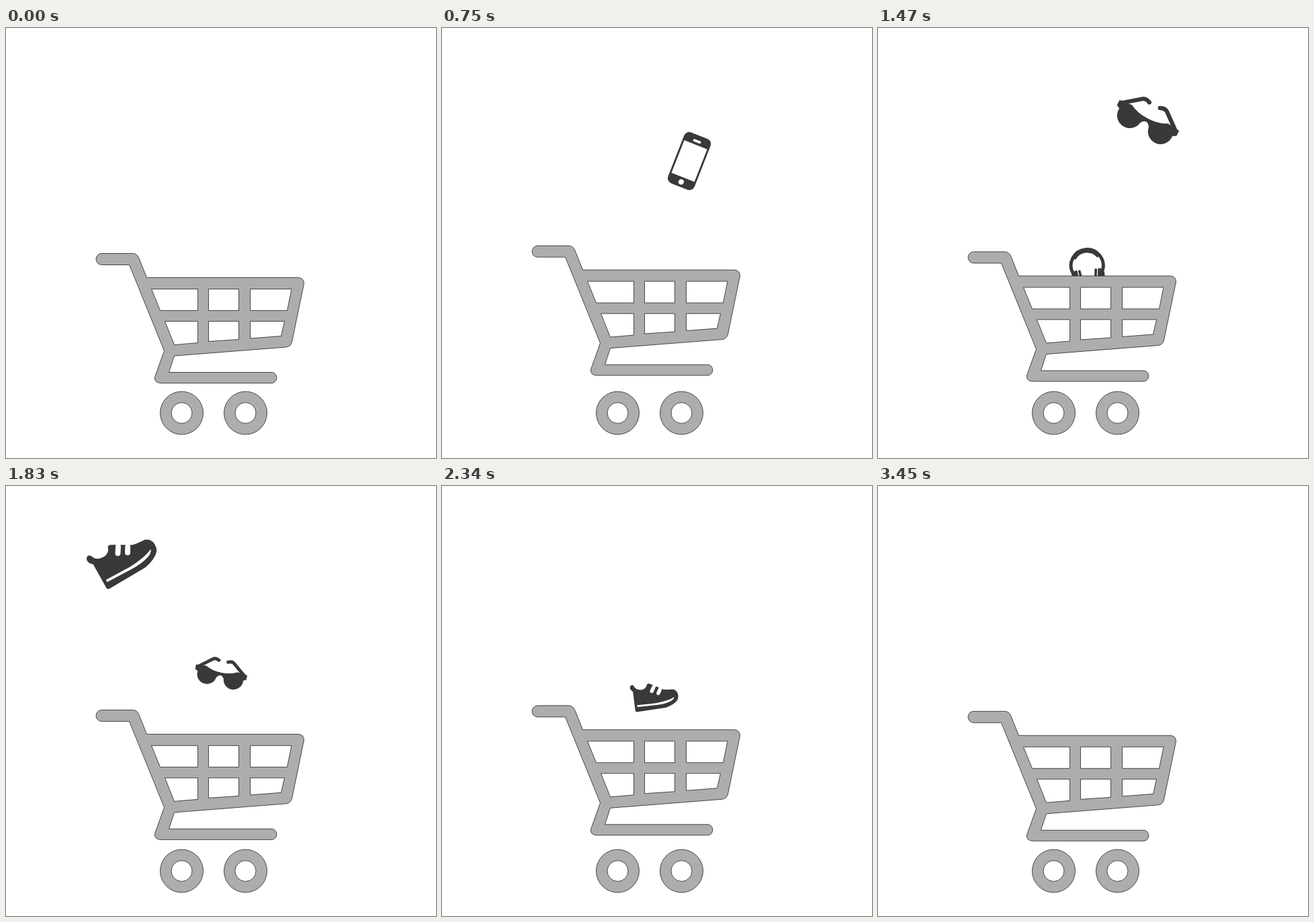
Animation of 640 by 640 pixels, one loop 3.48 s. Source, as an HTML page:

```html
<!DOCTYPE html>
<html lang="en">
<head>
<meta charset="utf-8">
<title>Shopping cart</title>
<style>
  html, body { margin: 0; width: 100%; height: 100%; overflow: hidden; background: #fff; }
  svg { display: block; width: 100vw; height: 100vh; }
  .item { fill: #38393a; visibility: hidden; }
  .line { fill: none; stroke: #38393a; stroke-linecap: round; }
  .white { fill: #fff; }
  .lace { fill: none; stroke: #fff; stroke-linecap: round; }
  .metal { fill: #adadad; stroke: #222; stroke-width: .8; fill-rule: evenodd; }
</style>
</head>
<body>
<svg viewBox="0 0 640 640">
  <g class="item" id="shirt">
    <path d="M-18-42Q0-30 18-42L36-35 52-8 34 2 28-6V42H-28V-6L-34 2-52-8-36-35Z"/>
  </g>

  <g class="item" id="phone">
    <rect x="-26" y="-50" width="52" height="100" rx="10"/>
    <rect class="white" x="-22.5" y="-32" width="45" height="64"/>
    <rect class="white" x="-7.5" y="-41" width="15" height="4.5" rx="2"/>
    <circle class="white" cy="41" r="5"/>
  </g>

  <g class="item" id="headphones">
    <path class="line" stroke-width="8" d="M-36 10A39 39 0 1 1 36 10"/>
    <path class="line" stroke-width="5" d="M-27-25A33.6 33.6 0 0 1 27-25"/>
    <g id="cup" transform="translate(18 20) rotate(8)">
      <rect x="-3" y="-16" width="6" height="32" rx="2.5"/>
      <path d="M5-17h5q12 2 12 17t-12 17h-5z"/>
    </g>
    <use href="#cup" transform="scale(-1 1)"/>
  </g>

  <g class="item" id="glasses">
    <path d="M-56-8L-34-10Q-20-2 0-2T34-10L56-8V2L50 5A21 21 0 0 1 8 10Q4 4 0 4T-8 10A21 21 0 0 1-50 5L-56 2Z"/>
    <path class="line" stroke-width="7" d="M-52-4L-23-27Q-18-31-10-27M52-4L23-27Q18-31 10-27"/>
  </g>

  <g class="item" id="shoe">
    <path d="M-40-22Q-47-28-45-34-41-41-36-35-34-27-27-25-18-22-13-25-8-27-6-33-4-37 1-34L28-18Q32-15 51-14 59-11 61-3 62 6 58 12 50 21 30 25L-37 25Q-41 25-41 21Z"/>
    <path class="white" d="M-35 10L8 11.500Q36 11 52 4 50 10 40 13 26 17 8 16L-35 14Z"/>
    <path class="lace" stroke-width="8.500" stroke-linecap="round" d="M9-26L3-17M22-18L17-10"/>
  </g>

  <g transform="translate(.5 .5)">
    <path class="metal" id="cart" d="M142 335H188Q194 335 197 341L209 371H435Q443 372 443 380L425 467Q423 474 416 474.500
      L250 487.500 242 512H396A8.200 8.200 0 0 1 396 528H229Q220 527 221 519L235 480 183 352H142A8.500 8.500 0 0 1 142 335Z
      M216 388H285V420H229Z M301 388H346V420H301Z M363 388H424.500L418 420H363Z
      M236 436H285V468L250 471Z M301 436H346V463L301 466Z M363 436H414L409 458 363 461.500Z"/>
    <path class="metal" id="wheel" d="M229 572.500a32 32 0 0 1 64 0a32 32 0 0 1-64 0M245.500 572.500a15.500 15.500 0 0 0 31 0a15.500 15.500 0 0 0-31 0"/>
    <use href="#wheel" x="95"/>
  </g>
</svg>
<script>
  const LOOP = 3480, STEP = 30, FALL = 840;
  const $ = id => document.getElementById(id);

  // start time, side offset, landing x, starting y
  const items = [
    { id: "shirt",      start: -45,  dx: -230, x: 314, y: 105 },
    { id: "phone",      start: 410,  dx: 188,  x: 314, y: 105 },
    { id: "headphones", start: 770,  dx: -177, x: 314, y: 101 },
    { id: "glasses",    start: 1270, dx: 180,  x: 307, y: 92 },
    { id: "shoe",       start: 1700, dx: -220, x: 319, y: 91 }
  ];

  function drawItem({ id, start, dx, x, y }, t) {
    const el = $(id), p = (t - start) / FALL;
    const visible = t > 0 && p >= 0 && p < .945;
    el.style.visibility = visible ? "visible" : "hidden";
    if (!visible) return;
    const px = x + dx * (1 - p) ** 2.4;
    const py = y + 330 * p ** 1.4;
    const angle = Math.sign(dx) * 36 * (1 - p);
    el.setAttribute("transform", `translate(${px} ${py}) rotate(${angle}) scale(${1 - .46 * p})`);
    el.style.opacity = Math.min(1, (.945 - p) / .07);
  }

  // The cart rises and sinks at constant speed, resting briefly as the loop restarts.
  function cartLift(t) {
    return t < STEP ? 0 : 11.6 * (1 - Math.abs((t + 136) % 1800 / 900 - 1));
  }

  function draw() {
    const t = Math.floor(performance.now() % LOOP / STEP) * STEP;
    items.forEach(item => drawItem(item, t));
    $("cart").setAttribute("transform", `translate(0 ${-cartLift(t)})`);
    requestAnimationFrame(draw);
  }
  draw();
</script>
</body>
</html>
```
